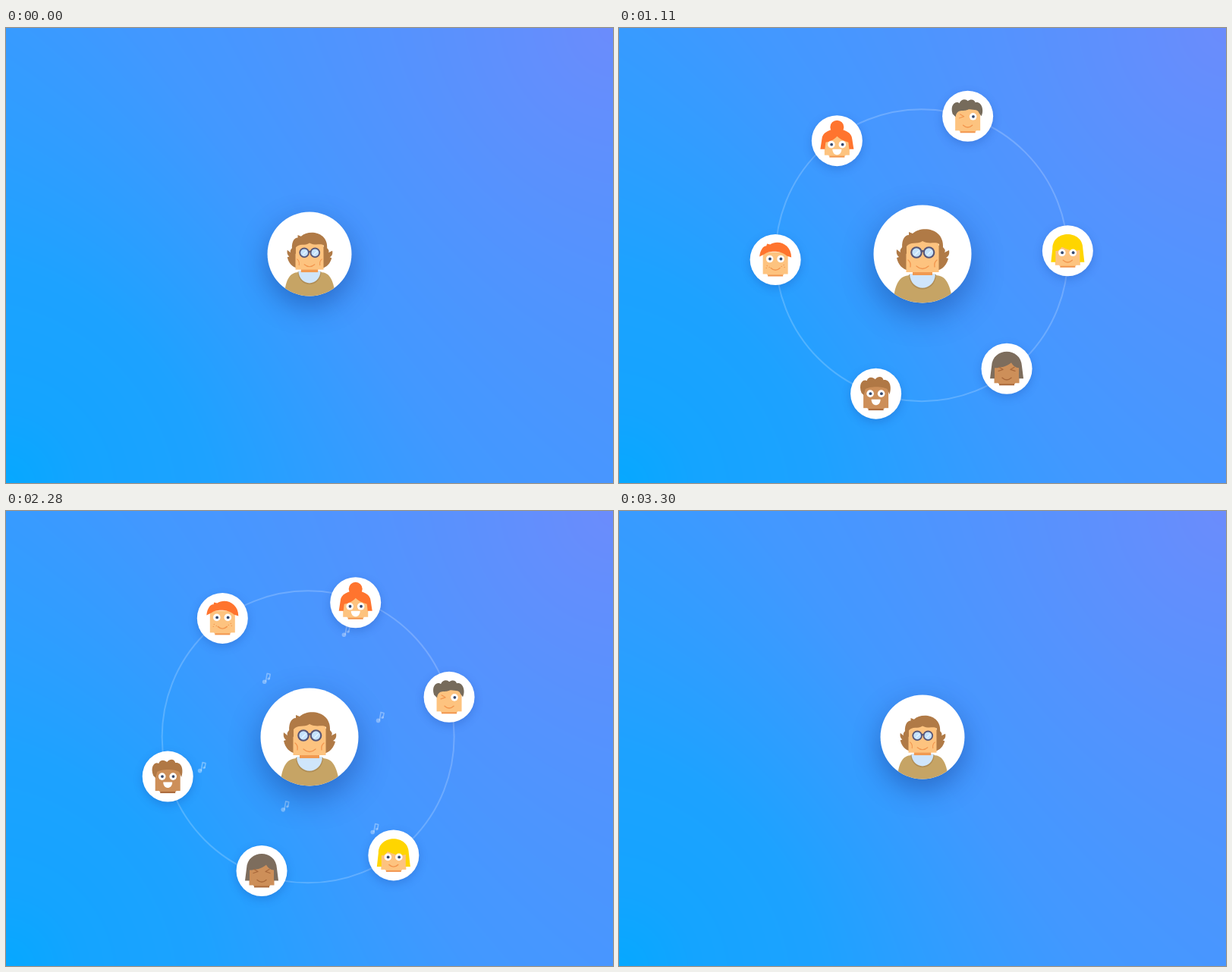
Write an HTML page with a canvas that moves like this. It is 800 px wide and 600 px high and loops after 3.51 s.

```html
<!DOCTYPE html>
<html lang="en">
<head>
<meta charset="utf-8">
<title>Orbiting avatars</title>
<style>
html, body { margin: 0; width: 100%; height: 100%; overflow: hidden; }
canvas { display: block; width: 800px; height: 600px; }
</style>
</head>
<body>
<canvas id="stage" width="800" height="600"></canvas>
<script>
const LOOP = 3510, STEP = 30, TAU = Math.PI * 2;
const ctx = document.getElementById('stage').getContext('2d');
const HUB = { x: 400, y: 298 };
const PIVOT = { x: 400.3, y: 298 };
const PEACH = '#fdc37f', TAN = '#cd8f59', ORANGE = '#f2954d', RUST = '#a9683a';

// Avatar centres at the moment the orbit angle is zero.
const people = [
  { x: 408, y: 107, skin: PEACH, line: ORANGE, hair: '#766b5b', eyeY: 0.5, wink: true, mouthY: 12,
    path: 'M-20 -3C-24 -16 -15 -21 -11 -17C-9 -23 -2 -23 0 -20C4 -23 9 -22 10 -18C18 -20 22 -8 18 0L15 -4C13 -10 6 -8 1 -9C-6 -5 -14 -11 -16 1Z' },
  { x: 583, y: 242, skin: PEACH, line: ORANGE, hair: '#ffd500', eyeY: 2.5, mouthY: 12.5,
    path: 'M-22 15L-20 -3C-20 -28 20 -28 20 -3L22 15L16 15L16 -1C4 2 -4 -4 -8 -5C-10 -1 -14 1 -16 0L-16 15Z' },
  { x: 548, y: 413.5, skin: TAN, line: RUST, hair: '#7d6d5d', eyeY: 1, closed: true, mouthY: 12,
    path: 'M-22 13L-20 -3C-19 -29 19 -29 20 -3L22 13L16 13L16 -1C12 -1 8 -4 6 -8C0 -3 -8 -1 -16 -1L-16 13Z' },
  { x: 391, y: 492, skin: TAN, line: RUST, hair: '#b07845', eyeY: 0, grin: true, mouthY: 10,
    path: 'M-19 -1C-24 -14 -16 -20 -12 -17C-10 -23 -4 -22 -1 -19C3 -24 9 -23 10 -18C19 -19 21 -8 18 1L15 -6C9 -10 -8 -10 -14 -6L-16 2Z' },
  { x: 215.5, y: 358, skin: PEACH, line: ORANGE, hair: '#ff742e', eyeY: -1, freckles: true, mouthY: 11,
    path: 'M-21 -4C-20 -14 -15 -19 -12 -18L-11 -21L-7 -20C4 -27 21 -20 21 -3L15 -5C8 -12 -4 -11 -9 -10C-13 -9 -16 -6 -21 -4Z' },
  { x: 251, y: 185, skin: PEACH, line: ORANGE, hair: '#ff742e', eyeY: 5, grin: true, mouthY: 13.5,
    path: 'M-22 11L-20 -2C-19 -20 19 -20 20 -2L22 11L16 11L15 2C8 0 3 -3 0 -6C-3 -2 -9 1 -15 2L-16 11ZM-9 -18a9 9 0 1 1 18 0a9 9 0 1 1 -18 0Z' }
];

// Each wave of notes flies from the hub towards three of the people.
const waves = [
  { start: 860, to: [1, 3, 5] },
  { start: 1352, to: [0, 2, 4] },
  { start: 1764, to: [1, 3, 5] }
];

const backdrop = makeBackdrop();

function makeBackdrop() {
  const stops = [[0, 6, 168, 255], [.1, 20, 164, 255], [.25, 29, 162, 255], [.5, 66, 152, 255], [1, 107, 140, 252]];
  const image = ctx.createImageData(800, 600);
  for (let y = 0, i = 0; y < 600; y++) for (let x = 0; x < 800; x++, i += 4) {
    const a = Math.hypot(x, 600 - y), f = a / (a + Math.hypot(800 - x, y));
    let k = 1;
    while (f > stops[k][0]) k++;
    const p = stops[k - 1], q = stops[k], u = (f - p[0]) / (q[0] - p[0]);
    for (let c = 0; c < 3; c++) image.data[i + c] = p[c + 1] + (q[c + 1] - p[c + 1]) * u;
    image.data[i + 3] = 255;
  }
  return image;
}

const clamp = v => Math.max(0, Math.min(1, v));
const progress = (t, start, end) => clamp((t - start) / (end - start));
const smooth = p => (1 - Math.cos(Math.PI * p)) / 2;
const backOut = p => 1 + 2.33 * (p - 1) ** 3 + 1.33 * (p - 1) ** 2;

function fill(path, color) {
  ctx.fillStyle = color;
  ctx.fill(new Path2D(path));
}

function stroke(path, color, width) {
  ctx.strokeStyle = color;
  ctx.lineWidth = width;
  ctx.stroke(new Path2D(path));
}

function disc(x, y, r, color) {
  ctx.beginPath();
  ctx.arc(x, y, r, 0, TAU);
  ctx.fillStyle = color;
  ctx.fill();
}

function rect(x, y, w, h, color) {
  ctx.fillStyle = color;
  ctx.fillRect(x, y, w, h);
}

function at(x, y, scale, draw) {
  ctx.save();
  ctx.translate(x, y);
  ctx.scale(scale, scale);
  ctx.lineCap = ctx.lineJoin = 'round';
  draw();
  ctx.restore();
}

function badge(r, scale, offset, blur, shadow) {
  ctx.save();
  ctx.shadowColor = shadow;
  ctx.shadowOffsetY = offset * scale;
  ctx.shadowBlur = blur * scale;
  disc(0, 0, r, '#fff');
  ctx.restore();
}

function eye(x, y) {
  disc(x, y, 4.8, '#fff');
  disc(x + .3, y, 1.9, '#35496f');
}

function drawPerson(p, scale) {
  badge(33.5, scale, 4, 12, 'rgba(20,60,150,.25)');
  rect(-10, 16, 20, 6, p.line);
  rect(-16.5, -10, 33, 29, p.skin);
  rect(-11, 17, 22, 3, p.skin);
  fill(p.path, p.hair);
  const y = p.eyeY;
  if (p.closed) {
    stroke(`M-10 ${y - 3}l5 3l-6 2M10 ${y - 3}l-5 3l6 2`, p.line, 1.3);
  } else {
    if (p.wink) stroke(`M-10 ${y - 3}l5 3l-6 2`, p.line, 1.2);
    else eye(-7.5, y);
    eye(7, y);
  }
  const m = p.mouthY;
  if (p.grin) fill(`M-6 ${m - 2.5}h12c0 10 -12 10 -12 0Z`, '#fff');
  else stroke(`M-6 ${m}q6 5.5 12 0`, p.line, 1.4);
  if (p.freckles) for (const [x, dy] of [[-11, 8], [-8, 10], [-12, 11], [8, 9], [11, 7], [12, 10]]) disc(x, dy, .7, p.line);
}

function drawHost(scale) {
  badge(64.5, scale, 15, 42, 'rgba(15,50,130,.45)');
  ctx.save();
  ctx.beginPath();
  ctx.arc(0, 0, 64.5, 0, TAU);
  ctx.clip();
  fill('M-39 66C-37 42 -32 28 -16 28H17C32 28 37 42 40 66Z', '#c6a465');
  fill('M-18 27H18C17 53 -17 53 -18 27Z', '#b08d55');
  fill('M-17 26H17C16 51 -16 51 -17 26Z', '#cfe5fb');
  ctx.restore();
  fill('M-23 -12C-29 -8 -30 -5 -29 -2L-34 -6C-35 0 -33 2 -31 4L-34 5C-32 14 -27 20 -18 22V-10Z', '#b07a46');
  fill('M23 -12C29 -8 31 -5 29 -2L35 -5C36 1 34 3 31 5L34 6C32 14 27 20 19 22V-10Z', '#b07a46');
  rect(-13, 22, 26, 6, '#f19a51');
  rect(-21.5, -18, 43, 42, PEACH);
  fill('M-26 -3C-29 -17 -24 -25 -18 -25L-18 -29L-13 -27C-1 -38 29 -34 27 -8L25 0L22 0V-13C17 -17 9 -12 0 -17C-7 -12 -16 -17 -21 -10V0Z', '#b07a46');
  for (const x of [-8, 8.5]) {
    disc(x, -2, 7.8, '#575575');
    disc(x, -2, 5.7, '#c4e2fb');
    stroke(`M${x - 2} 1l5 -5`, '#e8f5ff', 1.5);
  }
  stroke('M-1.5 -3q1.7 -2 3.4 0', '#575575', 2);
  stroke('M-8 16q8 7 16 0M-19 8q4 3 3 9M19 8q-4 3 -3 9', ORANGE, 1.3);
}

function drawNote() {
  ctx.globalAlpha = .34;
  disc(-2.5, 5, 2.8, '#fff');
  disc(3, 1, 1.7, '#fff');
  stroke('M-.8 4.5L1 -6L5 -5L4 .5', '#fff', 1.6);
}

function render(t) {
  ctx.putImageData(backdrop, 0, 0);
  const angle = (t - 780) * .0478 * Math.PI / 180;
  const scale = t < 1500 ? backOut(progress(t, 60, 590)) : backOut(1 - progress(t, 2800, 3245));
  const place = (x, y) => {
    const dx = (x - PIVOT.x) * scale, dy = (y - PIVOT.y) * scale;
    const c = Math.cos(angle), s = Math.sin(angle);
    return [PIVOT.x + dx * c - dy * s, PIVOT.y + dx * s + dy * c];
  };

  if (scale > .001) {
    const [rx, ry] = place(399.5, 300);
    at(rx, ry, scale, () => {
      ctx.beginPath();
      ctx.arc(0, 0, 192.5, 0, TAU);
      ctx.strokeStyle = 'rgba(255,255,255,.2)';
      ctx.lineWidth = 2;
      ctx.stroke();
    });
    for (const wave of waves) {
      const reach = (t - wave.start) * .104;
      if (reach < 50 || reach > 190) continue;
      for (const k of wave.to) {
        const p = people[k], dx = p.x - PIVOT.x, dy = p.y - PIVOT.y, d = reach / Math.hypot(dx, dy);
        at(...place(PIVOT.x + dx * d, PIVOT.y + dy * d), scale, drawNote);
      }
    }
    for (const p of people) at(...place(p.x, p.y), scale, () => drawPerson(p, scale));
  }

  const open = smooth(progress(t, 0, 360)) - smooth(progress(t, 2940, 3300));
  const hostScale = .86 + .14 * open;
  at(HUB.x, HUB.y, hostScale, () => drawHost(hostScale));
}

const begin = performance.now();
function tick() {
  const t = (performance.now() - begin) % LOOP;
  render(Math.floor(t / STEP) * STEP);
  requestAnimationFrame(tick);
}
tick();
</script>
</body>
</html>
```
